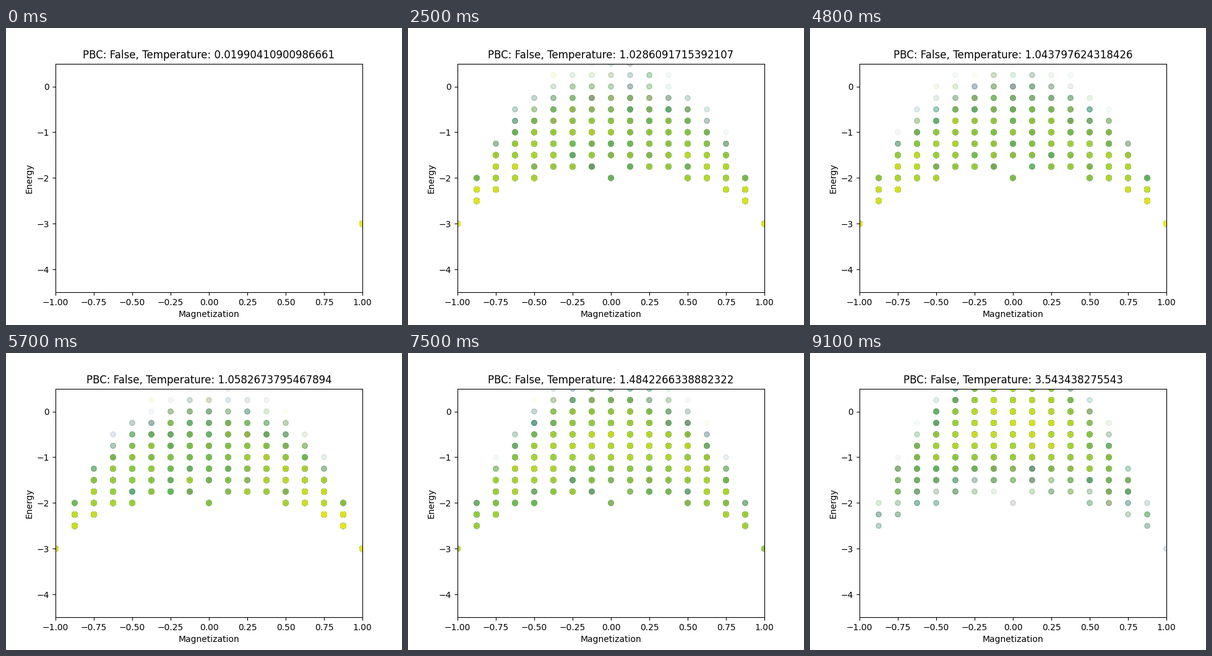
Recreate the animation shown at these times as a matplotlib script. Size 640 by 480 pixels, loop 9.2 s.

```python
import numpy as np
import matplotlib.pyplot as plt
from matplotlib.animation import FuncAnimation

SIZE = 4          # lattice side, open boundaries
SAMPLES = 10000   # sweeps recorded per temperature
ALPHA = 0.05      # opacity of one sample
LAYERS = 48       # most markers stacked on one state

# Temperatures are spread densely around the middle of the range.
x = np.linspace(-1, 1, 101)
temps = 1.043438275543 + 2.5 * np.sign(x) * np.abs(x) ** 4.5
temps = temps[temps > 0]


def simulate(seed=7):
    """Heat-bath Ising chains, one per temperature, all starting spin up."""
    rng = np.random.default_rng(seed)
    padded = np.zeros((len(temps), SIZE + 2, SIZE + 2))
    spins = padded[:, 1:-1, 1:-1]
    spins[:] = 1
    beta = 1 / temps[:, None, None]
    parity = np.indices((SIZE, SIZE)).sum(axis=0) % 2
    history = np.empty((SAMPLES,) + spins.shape, dtype=np.int8)
    for step in range(SAMPLES):
        for color in (0, 1):
            field = (padded[:, :-2, 1:-1] + padded[:, 2:, 1:-1]
                     + padded[:, 1:-1, :-2] + padded[:, 1:-1, 2:])
            up = field * beta > rng.logistic(size=spins.shape)
            np.copyto(spins, np.where(up, 1, -1), where=parity == color)
        history[step] = spins
    return history


def measure(history):
    """Total magnetization and energy, each bond counted from both ends."""
    mag = history.sum(axis=(2, 3), dtype=int)
    down = (history[:, :, 1:] * history[:, :, :-1]).sum(axis=(2, 3), dtype=int)
    right = (history[..., 1:] * history[..., :-1]).sum(axis=(2, 3), dtype=int)
    return mag, -2 * (down + right)


def stack_markers(mag, energy):
    """Merge the samples of each state into a few time-ordered layers."""
    state = (mag + 16) * 128 + energy + 64
    order = np.argsort(state, kind="stable")
    _, start, count = np.unique(state[order], return_index=True,
                                return_counts=True)
    rank = np.arange(SAMPLES) - np.repeat(start, count)
    layer = rank * LAYERS // np.maximum(np.repeat(count, count), LAYERS)
    _, first, group = np.unique(state[order] * LAYERS + layer,
                                return_index=True, return_inverse=True)
    group = group.ravel()
    merged = np.bincount(group)
    age = np.bincount(group, weights=order) / merged / (SAMPLES - 1)
    colors = plt.get_cmap("viridis")(age)
    colors[:, 3] = 1 - (1 - ALPHA) ** merged
    picked = order[first]
    return np.column_stack([mag[picked], energy[picked]]) / SIZE ** 2, colors


mags, energies = measure(simulate())

fig, ax = plt.subplots(figsize=(6.4, 4.8), dpi=100)
ax.set(xlim=(-1, 1), ylim=(-4.5, 0.5), xlabel="Magnetization", ylabel="Energy")
points = ax.scatter([], [])


def update(frame):
    offsets, colors = stack_markers(mags[:, frame], energies[:, frame])
    points.set_offsets(offsets)
    points.set_facecolor(colors)
    points.set_edgecolor(colors)
    ax.set_title(f"PBC: False, Temperature: {temps[frame]}")
    return (points,)


anim = FuncAnimation(fig, update, frames=len(temps), interval=100,
                     repeat=True, repeat_delay=0)
plt.show()
```
